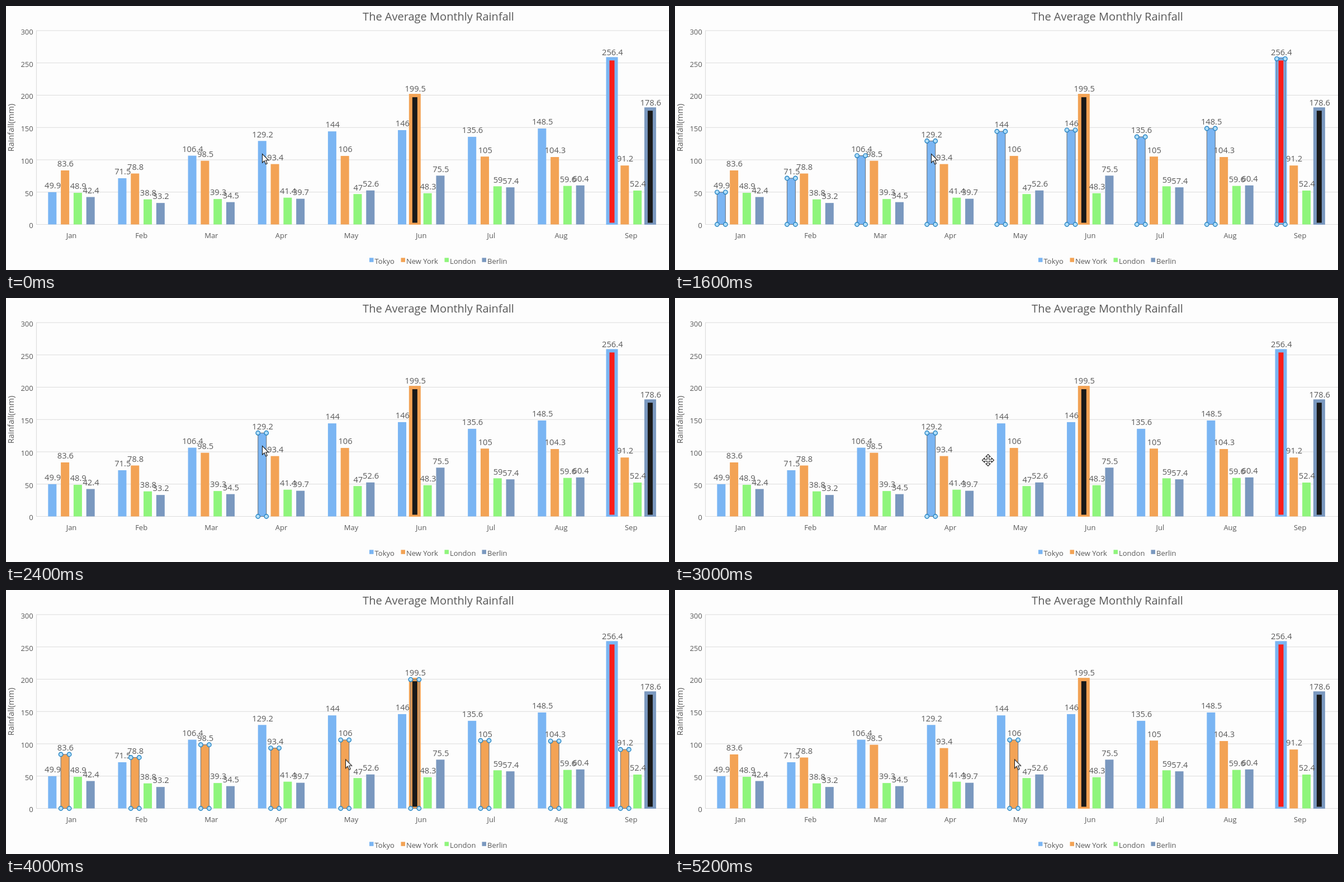
Animation, 1186 px wide and 472 px high, one loop 5.4 s. Source, as an HTML page:

```html
<!DOCTYPE html>
<html lang="en">
<head>
<meta charset="utf-8">
<title>Monthly rainfall</title>
<style>
  html, body { margin: 0; width: 100%; height: 100%; overflow: hidden; background: #fdfdfd; }
  svg { display: block; width: 1186px; height: 472px; font-family: "Open Sans", "Noto Sans", sans-serif; font-size: 13px; }
  text { fill: #595959; }
  .value { font-size: 14.7px; text-anchor: middle; }
  .mid { text-anchor: middle; }
  .grid { stroke: #dcdcdc; stroke-width: 1.2; }
  .outline { fill: none; stroke: #70757c; stroke-width: 1.1; }
  .handle { fill: #b0def9; stroke: #2382c2; stroke-width: 1.4; }
  .tip text { font-size: 15.2px; }
  .tip rect { fill: #fff; stroke: #d4d4d4; filter: drop-shadow(3px 3px 2px rgba(0, 0, 0, .5)); }

  .series0, .point0, .series1, .point1, .tip, .arrow, .move {
    animation: 5400ms step-end infinite;
  }
  .series0 { animation-name: series0; }
  .point0 { animation-name: point0; }
  .series1 { animation-name: series1; }
  .point1 { animation-name: point1; }
  .tip { animation-name: tip; }
  .arrow { animation-name: arrow; }
  .move { animation-name: move; }

  @keyframes series0 { 0%, 33.33% { visibility: hidden } 11.11% { visibility: visible } }
  @keyframes point0 { 0%, 74.07% { visibility: hidden } 40.74% { visibility: visible } }
  @keyframes series1 { 0%, 88.88% { visibility: hidden } 74.07% { visibility: visible } }
  @keyframes point1 { 0% { visibility: hidden } 92.59%, 100% { visibility: visible } }
  @keyframes tip { 0%, 74.07% { visibility: hidden } 62.96% { visibility: visible } }
  @keyframes arrow {
    0% { visibility: visible; transform: translate(458px, 264px) }
    51.85% { visibility: hidden; transform: translate(458px, 264px) }
    59.25%, 100% { visibility: visible; transform: translate(607px, 302.5px) }
  }
  @keyframes move {
    0%, 59.25% { visibility: hidden; transform: translate(560px, 290px) }
    51.85% { visibility: visible; transform: translate(502px, 275px) }
    55.55% { visibility: visible; transform: translate(560px, 290px) }
  }
</style>
</head>
<body>
<svg id="chart" viewBox="0 0 1186 472">
  <defs><clipPath id="plot"><path d="M54 40H1186V391H54z"/></clipPath></defs>
  <text class="mid" x="773.5" y="26.3" font-size="20">The Average Monthly Rainfall</text>
  <text class="mid" transform="translate(13.5 217.5) rotate(-90)" font-size="14.5">Rainfall(mm)</text>
  <g id="axes"></g>
  <g id="bars" clip-path="url(#plot)"></g>
  <g id="labels"></g>
  <g id="legend"></g>
  <g id="marks"></g>
  <g class="tip">
    <rect x="488.5" y="232.5" width="230" height="60"/>
    <text x="496.5" y="257.3">Series "New York" Point "May"</text>
    <text x="496.5" y="279">Value: 106</text>
  </g>
  <path class="arrow" d="M.5 .5V16.2L4.1 12.8L6.7 18.8L9.3 17.7L6.7 11.8H11.7Z" fill="#fff" stroke="#1c1c1c" stroke-width="1.1"/>
  <path class="move" d="M0 -10.5L4 -6.3H1.5V-1.5H6.3V-4L10.5 0L6.3 4V1.5H1.5V6.3H4L0 10.5L-4 6.3H-1.5V1.5H-6.3V4L-10.5 0L-6.3 -4V-1.5H-1.5V-6.3H-4Z" fill="#fff" stroke="#222" stroke-width="1.1"/>
</svg>
<script>
const months = ['Jan', 'Feb', 'Mar', 'Apr', 'May', 'Jun', 'Jul', 'Aug', 'Sep'];
const series = [
  { name: 'Tokyo', color: '#7ab5f3', key: 650, data: [49.9, 71.5, 106.4, 129.2, 144, 146, 135.6, 148.5, 256.4] },
  { name: 'New York', color: '#f3a355', key: 706.5, data: [83.6, 78.8, 98.5, 93.4, 106, 199.5, 105, 104.3, 91.2] },
  { name: 'London', color: '#8ff57c', key: 784.5, data: [48.9, 38.8, 39.3, 41.4, 47, 48.3, 59, 59.6, 52.4] },
  { name: 'Berlin', color: '#7a98bf', key: 851.5, data: [42.4, 33.2, 34.5, 39.7, 52.6, 75.5, 57.4, 60.4, 178.6] }
];
const fills = { '1-5': '#191919', '0-8': '#fb1d1a', '3-8': '#191919' };
const base = 390.5, barWidth = 15, step = 125.15;
const yOf = v => base - v * 1.155;
const xOf = (s, m) => 82.8 + s * 22.8 + m * step;

function add(parent, tag, attrs, text) {
  const node = document.createElementNS('http://www.w3.org/2000/svg', tag);
  for (const k in attrs) node.setAttribute(k, attrs[k]);
  if (text !== undefined) node.textContent = text;
  parent.appendChild(node);
  return node;
}
const layer = id => document.getElementById(id);
const axes = layer('axes'), bars = layer('bars'), labels = layer('labels');
const legend = layer('legend'), marks = layer('marks');

function barBox(s, m) {
  const y = yOf(series[s].data[m]);
  return { x: xOf(s, m) - barWidth / 2, y, width: barWidth, height: base - y };
}

function select(group, s, m) {
  const b = barBox(s, m);
  add(group, 'rect', { ...b, class: 'outline' });
  for (const cx of [b.x, b.x + barWidth])
    for (const cy of [b.y, base]) add(group, 'circle', { cx, cy, r: 3.7, class: 'handle' });
}

for (let v = 0; v <= 300; v += 50) {
  const y = yOf(v);
  add(axes, 'path', { d: `M54 ${y}H1186`, class: 'grid' });
  add(axes, 'text', { x: 48.7, y: y + 6.8, 'text-anchor': 'end' }, v);
}
add(axes, 'path', { d: `M54.5 44V${base}`, class: 'grid' });
months.forEach((name, m) =>
  add(axes, 'text', { x: 117 + m * step, y: 415.3, class: 'mid' }, name));

series.forEach(({ name, color, key, data }, s) => {
  data.forEach((v, m) => {
    const fill = fills[`${s}-${m}`];
    const paint = fill ? { fill, stroke: color, 'stroke-width': 6 } : { fill: color };
    add(bars, 'rect', { ...barBox(s, m), ...paint });
    add(labels, 'text', { x: xOf(s, m) + .8, y: yOf(v) - 6.7, class: 'value' }, v);
  });
  add(legend, 'rect', { x: key, y: 450.3, width: 7.5, height: 7.5, fill: color });
  add(legend, 'text', { x: key + 9.5, y: 461.3 }, name);
});

[3, 4].forEach((month, s) => {
  const all = add(marks, 'g', { class: `series${s}` });
  months.forEach((_, m) => select(all, s, m));
  select(add(marks, 'g', { class: `point${s}` }), s, month);
});
</script>
</body>
</html>
```
